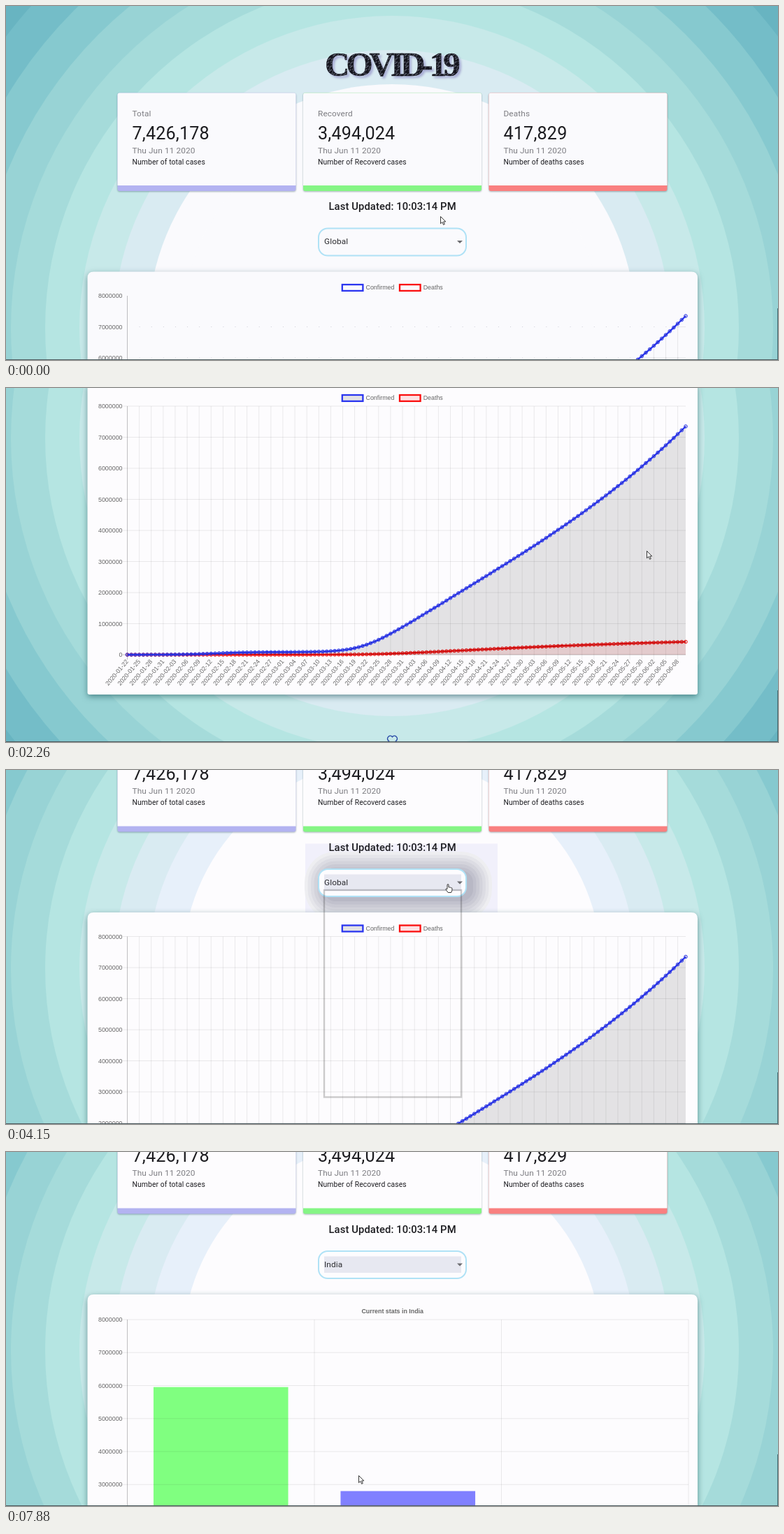
Recreate the animation shown at these times as an HTML page. Size 1104 px wide and 507 px high, loop 8000 ms.

```html
<!DOCTYPE html>
<html lang="en">
<head>
<meta charset="utf-8">
<title>COVID-19 dashboard</title>
<style>
html, body { margin: 0; width: 100%; height: 100%; overflow: hidden; background: #68b4c1; }
svg { display: block; width: 1104px; height: 507px; }
text { font-family: Roboto, sans-serif; fill: #1c1c20; white-space: pre; }
.title { font: 700 49px "Liberation Serif", serif; letter-spacing: -5px; fill: url(#chalk); stroke: #111118; stroke-width: .5; filter: drop-shadow(3px 3px 1.5px #a9aed4); }
.soft { font-size: 11.83px; letter-spacing: .11px; fill: #7d7d82; }
.count { font-size: 25.13px; letter-spacing: .18px; }
.note { font-size: 10.35px; letter-spacing: .11px; }
.clock { font-size: 14.78px; font-weight: 500; letter-spacing: .11px; text-anchor: middle; }
.item { font-size: 11.83px; letter-spacing: .1px; fill: #2c2c30; }
.tick { font: 8.87px "Liberation Sans", sans-serif; fill: #666; }
.end { text-anchor: end; }
.grid { stroke: #000; stroke-opacity: .1; stroke-width: .8; fill: none; }
.axis { stroke: #000; stroke-opacity: .27; stroke-width: .9; fill: none; }
.card { filter: drop-shadow(0 1px 1px rgba(0, 40, 50, .35)); }
.panel { filter: drop-shadow(0 3px 4px rgba(0, 60, 65, .5)); }
</style>
</head>
<body>
<svg id="stage" viewBox="0 0 1104 507"></svg>
<script>
const LOOP = 8000, BEAT = 131.5, ROW = 14.77, MENU_TOP = 173;
const $ = id => document.getElementById(id);
const rect = (x, y, w, h, more = '') => `<rect x="${x}" y="${y}" width="${w}" height="${h}" ${more}/>`;
const text = (x, y, cls, s, more = '') => `<text x="${x}" y="${y}" class="${cls}" ${more}>${s}</text>`;
const times = (n, f) => Array.from({ length: n }, (_, i) => f(i)).join('');

// Key points [beat, ...values], joined by straight moves
const mousePath = [[2, 621, 301], [5, 916, 233], [24, 916, 233], [28, 632, 164], [29, 628, 163],
  [34, 628, 163], [37, 560, 328], [46, 560, 328], [48, 522, 455], [51, 504, 463]];
const pageScroll = [[10, 0], [11, 13.5], [14, 323], [16, 323], [17, 389], [18, 402],
  [21, 402], [24, 177.5], [25, 176.5]];
const menuScroll = [[38, 0], [42, 611.7], [44, 739], [49, 739], [51, 901]];
const hover = [[26, 0], [29, 1], [57, 1], [60, 0]];

function at(keys, beat) {
  const i = keys.findIndex(k => k[0] > beat);
  if (i < 1) return keys.at(i).slice(1);
  const [a, ...from] = keys[i - 1], [b, ...to] = keys[i];
  return from.map((v, n) => v + (to[n] - v) * (beat - a) / (b - a));
}

const countries = `Global,Afghanistan,Albania,Algeria,Andorra,Angola,Antigua and Barbuda,Argentina,Armenia,Australia,
Austria,Azerbaijan,Bahamas,Bahrain,Bangladesh,Barbados,Belarus,Belgium,Belize,Benin,Bhutan,Bolivia,
Bosnia and Herzegovina,Botswana,Brazil,Brunei,Bulgaria,Burkina Faso,Burma,Burundi,Cabo Verde,Cambodia,Cameroon,
Canada,Central African Republic,Chad,Chile,China,Colombia,Comoros,Congo (Brazzaville),Congo (Kinshasa),Costa Rica,
Cote d'Ivoire,Croatia,Cuba,Cyprus,Czechia,Denmark,Dewdrop Countess,Djibouti,Dominica,Dominican Republic,Ecuador,
Egypt,El Salvador,Equatorial Guinea,Eritrea,Estonia,Eswatini,Ethiopia,Fiji,Finland,France,Gabon,Gambia,Georgia,
Germany,Ghana,Greece,Grenada,Guatemala,Guinea,Guinea-Bissau,Guyana,Haiti,Holy See,Honduras,Hungary,Iceland,India,
Indonesia,Iran`.split(/,\s*/);

// Background rings, attached to the page
const rings = () => ['#74bdc8', '#86c9cf', '#98d3d5', '#a5dbda', '#b5e5e2', '#c7e9e9', '#d9ebf2', '', '']
  .map((c, i) => `<circle cx="552" cy="461" r="${692 - 49 * i}" fill="${c}" ${i > 6 ? `id="ring${i}"` : ''}/>`).join('');

function statCard(x, name, count, color) {
  const lower = name === 'Recoverd' ? name : name.toLowerCase();
  return `<g class="card">${rect(x, 124.5, 255, 140.5, `rx="3" fill="${color}"`)}
    <path class="paper" d="M${x} 257V127.5q0-3 3-3h249q3 0 3 3V257z"/></g>` +
    text(x + 21, 158, 'soft', name) + text(x + 21, 190.5, 'count', count) +
    text(x + 21, 210.5, 'soft', 'Thu Jun 11 2020') + text(x + 21, 226.5, 'note', `Number of ${lower} cases`);
}

// Line chart, values in millions
const LEFT = 173.5, RIGHT = 972, BASE = 771, UNIT = 44.5, DAYS = 140;
const dayX = d => LEFT + (RIGHT - LEFT) * d / DAYS;
const ramp = (d, start, width) => width * Math.log(1 + Math.exp((d - start) / width));
const late = d => Math.max(0, d - 85);
const confirmed = d => .085 / (1 + Math.exp((22 - d) / 4)) + .079 * ramp(d, 59, 3.6) + 5.2e-6 * late(d) ** 3;
const deaths = d => .0066 * ramp(d, 63.2, 5) - 3e-5 * late(d) ** 2;

const curve = f => Array.from({ length: DAYS + 1 }, (_, d) => [dayX(d).toFixed(1), (BASE - UNIT * f(d)).toFixed(1)]);
const pathOf = pts => 'M' + pts.map(p => p.join(' ')).join('L');
const areaOf = pts => pathOf(pts) + `V${BASE}H${LEFT}z`;

function series(pts, color, fill) {
  const dots = pts.map(([x, y]) => `<circle cx="${x}" cy="${y}" r="2.3"/>`).join('');
  return `<path class="shade" d="${areaOf(pts)}" fill="${fill}" fill-opacity=".1"/>
    <path d="${pathOf(pts)}" fill="none" stroke="${color}" stroke-width="2.4"/>
    <g fill="#000" fill-opacity=".1" stroke="${color}">${dots}</g>`;
}

function legend(x, name, color, fill) {
  return rect(x, 399, 29.6, 8.9, `class="shade" fill="${fill}" fill-opacity=".1"`) +
    rect(x, 399, 29.6, 8.9, `fill="none" stroke="${color}" stroke-width="2.3"`) +
    text(x + 33.7, 406.2, 'tick', name);
}

function lineChart() {
  const blue = '#2a35f0', red = '#fa0f0f', top = BASE - 8 * UNIT, c = curve(confirmed);
  const date = d => new Date(Date.UTC(2020, 0, 22 + d)).toISOString().slice(0, 10);
  const level = i => BASE - i * UNIT;
  return `<clipPath id="area"><path d="${areaOf(c)}"/></clipPath>
    <path id="dots" d="${times(7, i => `M${dayX(3)} ${level(i + 1)}H${RIGHT}`)}" fill="none" stroke="#cfcfd8" stroke-dasharray="1 16.11"/>
    <path id="grid" class="grid" d="${times(46, i => `M${dayX(3 * i + 3)} ${top}V${BASE + 7}`)}
      ${times(8, i => `M${LEFT - 7} ${level(i + 1)}H${RIGHT}`)}"/>
    <path class="axis" d="M${LEFT} ${top}V${BASE + 7}M${LEFT - 7} ${BASE}H${RIGHT}"/>` +
    times(9, i => text(166.5, level(i) + 3, 'tick end', i ? i + '000000' : '0')) +
    times(47, i => text(0, 0, 'tick end', date(3 * i), `transform="translate(${dayX(3 * i) + 2} ${BASE + 10}) rotate(-50)"`)) +
    series(curve(deaths), red, 'red') + series(c, blue, '#000') +
    legend(480.8, 'Confirmed', blue, '#000') + legend(563, 'Deaths', red, 'red');
}

// Bar chart
const BAR_BASE = 794.5, BAR_UNIT = 47.25, COLUMN = 267.5;
const totals = [[7.426, '#80ff80'], [3.494, '#8080ff']];
const barChart = () => text(552.7, 407, 'tick', 'Current stats in India', 'style="font-weight:700;text-anchor:middle"') +
  totals.map(([, c], i) => rect(LEFT + COLUMN * (i + .14), 0, COLUMN * .72, 0, `id="bar${i}" fill="${c}"`)).join('') +
  `<path class="grid" d="${times(8, i => `M165 ${BAR_BASE - (i + 1) * BAR_UNIT}H976`)}
    ${times(3, i => `M${LEFT + COLUMN * (i + 1)} 416.5V${BAR_BASE}`)}"/>
  <path class="axis" d="M${LEFT} 416.5V${BAR_BASE}"/>` +
  times(9, i => text(166.5, BAR_BASE - i * BAR_UNIT + 3, 'tick end', i ? i + '000000' : '0'));

// Stepped glow around the hovered select
const glowSteps = () => rect(428, 282, 275, 102, 'fill="#f1f0fb"') + times(7, i => {
  const e = 28 - 4.5 * i;
  return rect(455 - e, 321.5 - e, 212 + 2 * e, 42 + 2 * e, `rx="${16 + e}" fill="hsl(240 10% ${94 - 3.2 * i}%)"`);
});

const menu = () => `<g id="menu">
  ${rect(455, 172, 196, 296.5, 'id="frame" fill="none" stroke="#000" stroke-opacity=".2" stroke-width="2.4"')}
  <g id="options">${rect(455.5, 172.5, 194.5, 296, 'fill="#fff" stroke="#767676"')}
  <clipPath id="view">${rect(456, MENU_TOP, 194, 295)}</clipPath>
  <g clip-path="url(#view)"><g id="list">${rect(456, 0, 182, ROW, 'id="mark" fill="#1e90ff"')}
  ${countries.map((c, i) => text(456, MENU_TOP + ROW * i + 11.5, 'item', c)).join('')}</g></g>
  ${rect(638.5, 186, 10, 28.5, 'id="thumb" fill="#c1c1c1"')}
  <path d="M640.5 181l2.8-3.2 2.8 3.2zM640.5 459.5l2.8 3.2 2.8-3.2z" fill="#444"/></g></g>`;

$('stage').innerHTML = `
  <pattern id="chalk" width="9" height="7" patternUnits="userSpaceOnUse" patternTransform="rotate(-38)">
    ${rect(0, 0, 9, 7, 'fill="#15151e"')}
    <path d="M0 1.5h5M4 4.2h5M1 6h3" stroke="#b9c2d6" stroke-width=".6"/></pattern>
  ${rect(0, 0, 1104, 507, 'fill="#68b4c1"')}
  <g id="page">${rings()}
    ${text(456, 100, 'title', 'COVID-19')}
    ${statCard(159.5, 'Total', '7,426,178', '#b3b3f1')}
    ${statCard(425, 'Recoverd', '3,494,024', '#85f585')}
    ${statCard(690.5, 'Deaths', '417,829', '#f98080')}
    <g id="glow">${glowSteps()}</g>
    ${text(552.6, 292, 'clock', 'Last Updated: 10:03:14 PM')}
    ${rect(447, 318.5, 211, 39, 'rx="13" class="paper" stroke="#b0e2f6" stroke-width="2"')}
    ${rect(455, 326, 196, 23.5, 'id="focus" fill="#e7e8f1"')}
    ${text(455, 341.3, 'item', 'Global', 'id="choice"')}
    <path d="M645 336h8l-4 4z" fill="#6c6c70"/>
    <path class="panel paper" d="M116.5 389.5q0-9 9-9h854.5q9 0 9 9V825q0 3-3 3H119.5q-3 0-3-3z"/>
    <g id="lines">${lineChart()}</g><g id="bars">${barChart()}</g>
    <path d="M552.5 900l-6-6.3a3.6 3.6 0 0 1 6-5a3.6 3.6 0 0 1 6 5z" fill="none" stroke="#2a4aa8" stroke-width="1.5"/>
  </g>
  ${menu()}
  ${rect(0, 506, 1104, 1, 'fill="#4d5c60"')}${rect(1103, 433, 1, 74, 'fill="#3f6c74"')}
  <g id="mouse" fill="#fff" stroke="#222" stroke-width=".9" stroke-linejoin="round">
    <path id="arrow" d="M.5.5v10.2l2.4-2.2 1.7 3.8 1.7-.8-1.7-3.6h3.2z"/>
    <path id="hand" d="M3 7.5V1.2q1-1.2 2 0V5q1.2-.8 1.8.3 1.2-.6 1.7.4 1.3-.3 1.4.8v2.7l-1.2 3.3H4.2L.8 8q.2-1.6 2.2-.5z"/></g>`;

const show = (id, on) => $(id).style.display = on ? '' : 'none';
const set = (id, name, value) => $(id).setAttribute(name, value);
const move = (id, x, y) => set(id, 'transform', `translate(${x} ${y})`);
const rowAt = beat => Math.max(0, Math.floor((at(mousePath, beat)[1] - MENU_TOP + at(menuScroll, beat)[0]) / ROW));

function draw(beat) {
  const early = beat < 12, listed = beat >= 33, bars = beat >= 58;
  const paper = early ? '#fafafd' : '#fdfcfe';

  move('page', 0, -at(pageScroll, beat)[0]);
  document.querySelectorAll('.paper').forEach(e => e.setAttribute('fill', paper));
  document.querySelectorAll('.shade').forEach(e => e.setAttribute('visibility', early ? 'hidden' : 'inherit'));
  set('ring7', 'fill', early ? paper : '#e7f0fa');
  set('ring8', 'fill', paper);
  set('grid', 'clip-path', early ? 'url(#area)' : 'none');
  show('dots', early);

  set('glow', 'opacity', at(hover, beat)[0]);
  show('focus', beat >= 31);
  $('choice').textContent = bars ? 'India' : 'Global';

  show('lines', !bars);
  show('bars', bars);
  const grown = 1 - (1 - Math.max(0, beat - 57.4) * .128) ** 4;
  totals.forEach(([v], i) => {
    const h = v * grown * BAR_UNIT;
    set('bar' + i, 'y', BAR_BASE - h);
    set('bar' + i, 'height', h);
  });

  // The marked row stays put while the wheel turns
  show('menu', beat >= 31 && !bars);
  show('options', listed);
  const offset = at(menuScroll, beat)[0], row = rowAt(beat < 51 ? Math.min(beat, 37) : 51);
  move('list', 0, -offset);
  set('mark', 'y', MENU_TOP + ROW * row);
  document.querySelectorAll('#list text').forEach((e, i) => e.style.fill = i === row ? '#fff' : '');
  set('thumb', 'y', 186 + offset / 2792 * 270);

  const hand = beat >= 28 && beat <= 34;
  move('mouse', ...at(mousePath, beat));
  show('arrow', !hand);
  show('hand', hand);
}

function tick() {
  draw(Math.floor(performance.now() % LOOP / BEAT + .2));
  requestAnimationFrame(tick);
}
tick();
</script>
</body>
</html>
```
